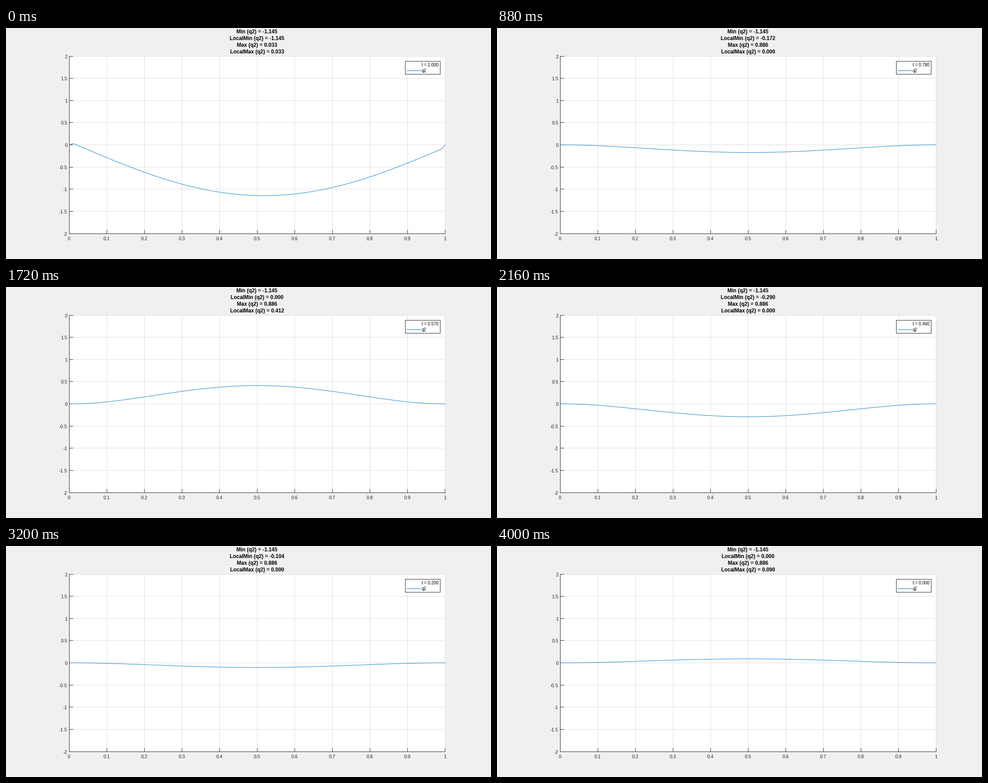
Recreate the animation shown at these times as a matplotlib script. Size 1084 px wide and 517 px high, loop 4040 ms.

```python
import math

import numpy as np
import matplotlib.pyplot as plt
from matplotlib.animation import FuncAnimation
from matplotlib.patches import Rectangle

W, H, DPI = 1084, 517, 64
STEPS, DT = 101, 0.01
LEFT, RIGHT, TOP, BOTTOM = 141.5, 981.5, 63.0, 460.1
DARK, GRID, BLUE = "#262626", "#dedede", "#0072bd"
FONT = "Liberation Sans"


def px(size):
    """Pixels to points."""
    return size * 72 / DPI


def to_x(v):
    return LEFT + (RIGHT - LEFT) * v


def to_y(v):
    return TOP + (BOTTOM - TOP) * (2 - v) / 4


def beam_motion(x):
    """Clamped beam released from a tilted sine, damped by implicit time steps."""
    start = -1.145 * np.sin(3.15 * x - 0.0602)
    start[[0, -1]] = 0
    m = len(x) - 4
    stiff = 6 * np.eye(m)
    for k, c in ((1, -4), (2, 1)):
        stiff += c * (np.eye(m, k=k) + np.eye(m, k=-k))
    lam, modes = np.linalg.eigh(stiff)
    omega = 0.2279 * np.sqrt(lam / lam[0])
    n = np.arange(STEPS)[:, None]
    amp = modes.T @ start[2:-2]
    gain = amp * (1 + omega**2) ** (-n / 2) * np.cos(n * np.arctan(omega))

    # the slow first mode carries nearly all of the visible swing
    peak = np.abs(modes[:, 0]).max() * np.sign(modes[m // 2, 0])
    swing = 1.2577 * np.exp(-2.53 * DT * n) * np.cos(3.1209 - 22.42 * DT * n)
    gain[:, 0] = swing[:, 0] / peak

    y = np.zeros((STEPS, len(x)))
    y[:, 2:-2] = gain @ modes.T
    y[0] = start
    return y


x = np.linspace(0, 1, 101)
curves = beam_motion(x)
low, high = curves.min(axis=1), curves.max(axis=1)
stats = (
    ("Min", np.minimum.accumulate(low)),
    ("LocalMin", low),
    ("Max", np.maximum.accumulate(high)),
    ("LocalMax", high),
)

fig = plt.figure(figsize=(W / DPI, H / DPI), dpi=DPI, facecolor="#f0f0f0")
ax = fig.add_axes([0, 0, 1, 1])
ax.set_xlim(0, W)
ax.set_ylim(H, 0)
ax.axis("off")


def box(x0, y0, x1, y1, color, z):
    """Fill whole pixels from (x0, y0) up to and including (x1, y1)."""
    ax.add_patch(Rectangle((x0, y0), x1 - x0 + 1, y1 - y0 + 1, fc=color,
                           ec="none", lw=0, zorder=z, snap=False))


def label(tx, ty, text, size, color="black", ha="left", weight="normal"):
    return ax.text(tx, ty, text, fontsize=px(size), color=color, ha=ha,
                   va="baseline", family=FONT, weight=weight, zorder=6)


left, right, top, bottom = map(math.floor, (LEFT, RIGHT, TOP, BOTTOM))
box(left, top, right, bottom, "white", 0)

for v in np.linspace(0, 1, 11):
    col = math.floor(to_x(v) + 1e-6)
    box(col, top, col, bottom, GRID, 1)
    box(col, bottom - 8, col, bottom, DARK, 2)
    label(col, 475, f"{v:.1g}", 10.67, DARK, "center")

for v in np.linspace(-2, 2, 9):
    row = math.floor(to_y(v) + 1e-6)
    box(left, row, right, row, GRID, 1)
    box(left, row, left + 8, row, DARK, 2)
    label(137, row + 5, f"{v:g}", 10.67, DARK, "right")

box(left, top, left, bottom, DARK, 2)
box(left, bottom, right, bottom, DARK, 2)

box(892, 74, 970, 103, DARK, 4)
box(893, 75, 969, 102, "white", 4.5)
box(896, 95, 926, 95, BLUE, 5)
label(929, 99, "q2", 9.6)
clock = label(929, 86, "", 9.6)

titles = [label(561, 12 + 15 * i, "", 11.64, ha="center", weight="bold")
          for i in range(4)]
curve, = ax.plot([], [], color=BLUE, lw=px(0.9), zorder=3, snap=False)


def draw(n):
    curve.set_data(to_x(x), to_y(curves[n]))
    clock.set_text(f"t = {1 - n * DT:.3f}")
    for title, (name, values) in zip(titles, stats):
        value = round(float(values[n]), 3) + 0.0
        title.set_text(f"{name} (q2) = {value:.3f}")
    return [curve, clock, *titles]


anim = FuncAnimation(fig, draw, frames=STEPS, interval=40, repeat=True,
                     repeat_delay=0, blit=False)
plt.show()
```
